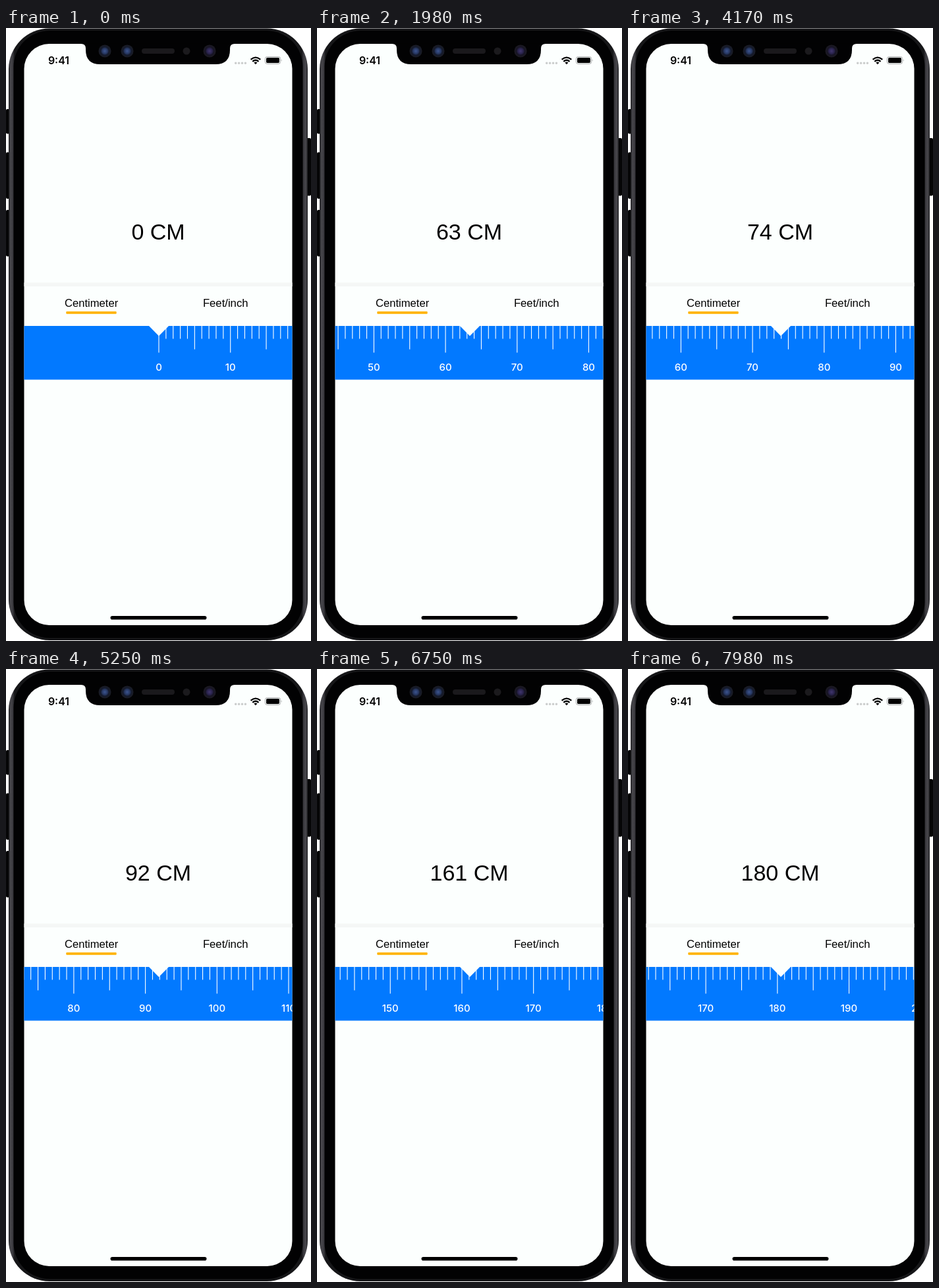
Write an HTML page that moves like this. It is 463 px wide and 930 px high and loops after 8000 ms.

```html
<!DOCTYPE html>
<html lang="en">
<head>
<meta charset="utf-8">
<title>Height ruler</title>
<style>
  html, body { margin: 0; width: 100%; height: 100%; overflow: hidden; background: #fff; }
  svg { display: block; width: 463px; height: 930px; }
  text { font-family: "Liberation Sans", Arial, sans-serif; text-anchor: middle; }
  .ui { font-family: Inter, sans-serif; }
</style>
</head>
<body>
<svg viewBox="0 0 463 930">
  <defs>
    <linearGradient id="rim">
      <stop offset="0" stop-color="#1a1a1d"/>
      <stop offset=".006" stop-color="#48474c"/>
      <stop offset=".014" stop-color="#3a393e"/>
      <stop offset=".02" stop-color="#161618"/>
      <stop offset=".98" stop-color="#161618"/>
      <stop offset=".986" stop-color="#3a393e"/>
      <stop offset=".994" stop-color="#48474c"/>
      <stop offset="1" stop-color="#1a1a1d"/>
    </linearGradient>
    <radialGradient id="blueLens">
      <stop offset="0" stop-color="#3c5590"/>
      <stop offset=".45" stop-color="#26365f"/>
      <stop offset=".65" stop-color="#141a2c"/>
      <stop offset="1" stop-color="#1b1c24"/>
    </radialGradient>
    <radialGradient id="violetLens">
      <stop offset="0" stop-color="#41366f"/>
      <stop offset=".45" stop-color="#28224a"/>
      <stop offset=".65" stop-color="#161424"/>
      <stop offset="1" stop-color="#1d1b22"/>
    </radialGradient>
    <clipPath id="band"><rect x="27.5" y="452" width="407" height="81.5"/></clipPath>
  </defs>

  <!-- Phone body -->
  <g fill="#050506">
    <rect x="0" y="123" width="10" height="37.5" rx="2"/>
    <rect x="0" y="188.5" width="10" height="70.5" rx="2"/>
    <rect x="0" y="276" width="10" height="70.5" rx="2"/>
    <rect x="452" y="167" width="11" height="87.5" rx="2"/>
  </g>
  <rect x="4" y=".5" width="454" height="928.5" rx="62" fill="url(#rim)"/>
  <rect x="11.5" y="4" width="439" height="921.5" rx="55" fill="#020203"/>
  <rect x="27.5" y="24" width="407" height="882" rx="38" fill="#fcfffe"/>

  <!-- Notch -->
  <path fill="#020203" d="M114 23.5V24Q121 24 121 31V33Q121 55 143 55H318Q340 55 340 33V31Q340 24 347 24V23.5Z"/>
  <rect x="206" y="31" width="50" height="8" rx="4" fill="#1a191c"/>
  <circle cx="150" cy="35" r="9.5" fill="url(#blueLens)"/>
  <circle cx="184" cy="35" r="9.5" fill="url(#blueLens)"/>
  <circle cx="274" cy="35" r="5.5" fill="#1b1a1d"/>
  <circle cx="309" cy="35" r="9.5" fill="url(#violetLens)"/>

  <!-- Status bar -->
  <text class="ui" x="80" y="55" font-size="16" font-weight="600">9:41</text>
  <path d="M348.7 53.2h15" stroke="#cbcdcd" stroke-width="3.6" stroke-linecap="round" stroke-dasharray="0 4.9"/>
  <g fill="none" stroke="#000" stroke-width="2.3">
    <path d="M371.6 47.9Q378.9 41.3 386.2 47.9"/>
    <path d="M374.3 50.8Q378.9 46.7 383.5 50.8"/>
  </g>
  <path d="M376.4 52.6Q378.9 50.6 381.4 52.6L378.9 55.2Z"/>
  <rect x="393.4" y="43.6" width="23.2" height="10.8" rx="3" fill="none" stroke="#a3a5a5"/>
  <rect x="395" y="45.1" width="20" height="7.8" rx="1.7"/>
  <path d="M417.8 47.2q1.7 1.8 0 3.6z" fill="#a3a5a5"/>

  <!-- Reading and unit tabs -->
  <text id="reading" x="231" y="320.5" font-size="34">0 CM</text>
  <rect x="27.5" y="386.3" width="407" height="5.7" fill="#f5f7f6"/>
  <text x="129.6" y="423" font-size="16.6">Centimeter</text>
  <text x="333.2" y="423" font-size="16.7">Feet/inch</text>
  <rect x="91.3" y="430" width="76.4" height="3.7" rx="1" fill="#ffb400"/>

  <!-- Ruler -->
  <rect x="27.5" y="452" width="407" height="81.5" fill="#0279ff"/>
  <g clip-path="url(#band)">
    <g id="scale" fill="#fff"><path id="ticks" stroke="#fff" stroke-width="1.1"/></g>
  </g>
  <path d="M216.5 451.5H247.5L232 467.3Z" fill="#fcfffe"/>

  <rect x="158.5" y="892" width="146" height="5.6" rx="2.8"/>
</svg>
<script>
const LOOP = 8000, STEP = 30, UNIT = 10.87, CENTER = 232;
const scale = document.getElementById('scale');
const reading = document.getElementById('reading');

// Ticks and a label on every tenth one
let path = '';
for (let cm = 0; cm <= 220; cm++) {
  const x = cm * UNIT;
  const bottom = cm % 10 === 0 ? 492.5 : cm % 5 === 0 ? 487.5 : 471.5;
  path += `M${x} 452V${bottom}`;
  if (cm % 10) continue;
  const label = document.createElementNS('http://www.w3.org/2000/svg', 'text');
  const attrs = { class: 'ui', x, y: 520, 'font-size': 15, 'font-weight': 500 };
  for (const name in attrs) label.setAttribute(name, attrs[name]);
  label.textContent = cm;
  scale.append(label);
}
document.getElementById('ticks').setAttribute('d', path);

// Two drags with long glides: [seconds, cm, cm per second]
const keys = [
  [0, 0, 40], [0.45, 29, 41], [1.2, 51.83, 20.5], [2.0, 63.6, 10.1],
  [2.76, 69.24, 5.2], [4.17, 73.95, 1.5], [6.06, 125.7, 52],
  [6.5, 153.9, 32], [7.41, 174, 14.4], [8, 180.65, 8.6]
];

function valueAt(t) {
  const i = Math.max(1, keys.findIndex(key => key[0] > t));
  const [t0, v0, s0] = keys[i - 1], [t1, v1, s1] = keys[i];
  const d = t1 - t0, u = (t - t0) / d, w = 1 - u;
  return v0 * w * w * (1 + 2 * u) + s0 * d * u * w * w
       + v1 * u * u * (3 - 2 * u) - s1 * d * u * u * w;
}

function draw(ms) {
  const cm = valueAt(Math.floor(ms / STEP) * STEP / 1000);
  scale.setAttribute('transform', `translate(${CENTER - cm * UNIT} 0)`);
  reading.textContent = `${Math.round(cm)} CM`;
}

const start = performance.now();
function frame() {
  draw((performance.now() - start) % LOOP);
  requestAnimationFrame(frame);
}
frame();
</script>
</body>
</html>
```
